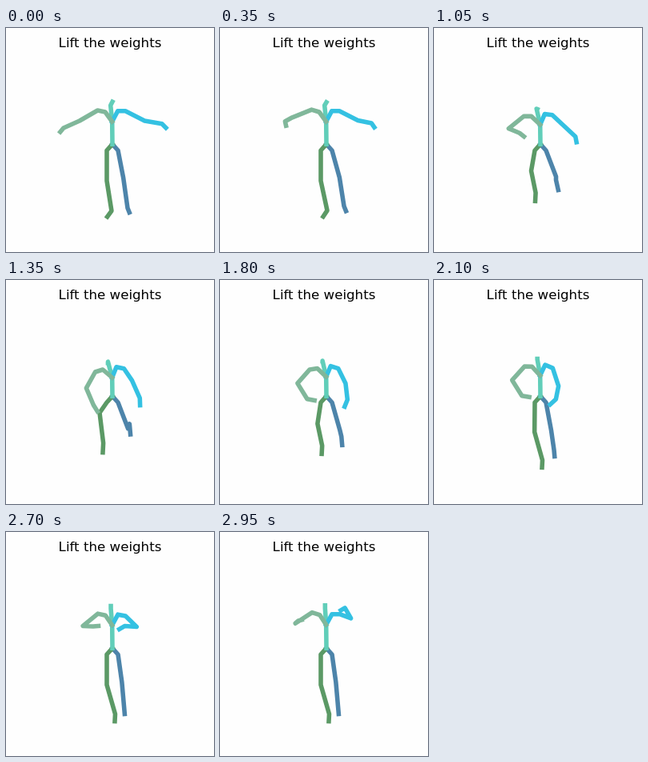
Recreate the animation shown at these times as an HTML page with a canvas. Size 260x280 px, loop 3 s.

```html
<!DOCTYPE html>
<html lang="en">
<head>
<meta charset="utf-8">
<title>Lift the weights</title>
<style>
html, body { margin: 0; width: 100%; height: 100%; overflow: hidden; background: #fefefe; }
canvas { display: block; }
</style>
</head>
<body>
<canvas id="stage" width="260" height="280"></canvas>
<script>
const ctx = document.getElementById('stage').getContext('2d');
const LOOP = 3000, STEP = 50;
const PELVIS = [133, 145.3], HIP_R = [140, 153], HIP_L = [126, 153];

// Smooth step from 0 to 1 between times a and b.
function ramp(t, a, b) {
  const u = Math.min(1, Math.max(0, (t - a) / (b - a)));
  return u * u * (3 - 2 * u);
}

// Joints of a limb built from [angle in degrees, signed length] bones.
function limb(root, ...bones) {
  const joints = [root];
  let [x, y] = root;
  for (const [angle, length] of bones) {
    const a = angle * Math.PI / 180;
    x += length * Math.cos(a);
    y += length * Math.sin(a);
    joints.push([x, y]);
  }
  return joints;
}

function chain(color, ...points) {
  ctx.strokeStyle = color;
  ctx.beginPath();
  points.forEach(p => ctx.lineTo(...p));
  ctx.stroke();
}

function draw(t) {
  // Phases of the movement, each going from 0 to 1.
  const pull = ramp(t, 0, 750);
  const step = ramp(t, 250, 850);
  const drop = ramp(t, 700, 1350);
  const turn = ramp(t, 1350, 1850);
  const curl = ramp(t, 1350, 2400);
  const lift = ramp(t, 2400, 2950);
  const squat = ramp(t, 750, 1350) - ramp(t, 1350, 2200);
  const lean = 5 * (ramp(t, 500, 1300) - ramp(t, 1400, 2750)) - lift;

  const chest = [132.7, 117 + lean];
  const neck = [130.7 - 0.65 * lean, 96.7 + 1.1 * lean];
  const head = [neck[0] + 2.3 * (1 - drop), neck[1] - 4.5 + 1.5 * pull + 0.9 * lean];
  const collarR = [139.7 - 0.35 * lean, chest[1] - 13.3];
  const collarL = [124 - 0.6 * lean, chest[1] - 12 + 0.4 * lean];
  const shoulderR = [collarR[0] + 9.5, collarR[1] + 2 * drop + 2.5 * curl - 4.5 * lift];
  const shoulderL = [collarL[0] - 9.5, collarL[1] - 2 - 2 * pull + 7 * drop - 4 * curl - 2 * lift];

  const rightLeg = limb(HIP_R,
    [79 - 10 * pull + 13 * curl, 35],
    [82 - 13 * step + 39 * (drop - turn) + 16 * curl, 38 - 21 * step - 23 * drop + 39 * curl],
    [68 + 17 * drop, 6 + 7 * step - 6 * curl]);

  const kneeL = [HIP_L[0] - 9 * squat, HIP_L[1] + 38 - 25 * squat];
  const leftLeg = limb(kneeL,
    [81 - 7 * pull + 9 * squat, 38 - 40 * squat * (1 - squat)],
    [126 - 33 * step, 9 + 3 * squat]);

  const rightArm = limb(shoulderR,
    [27 + 29 * drop + 20 * curl - 56 * lift, 27 - 2.4 * pull - 6.6 * drop + 7 * curl - 10 * lift],
    [10 + 4 * pull + 52 * drop + 44 * curl + 130 * lift, 22 - 10 * pull + 12 * drop - 9 * curl],
    [45 + 23 * pull + 20 * drop + 61 * curl, 7 - 2 * pull + 4 * drop + curl - 4 * lift]);

  const leftArm = limb(shoulderL,
    [150 + 18 * pull - 49 * drop + 13 * turn + 15 * lift, 26 - 3 * drop + 2 * lift],
    [156 - 10 * pull + 101 * drop - 9 * turn - 98 * lift, 22 - 26 * pull - 19 * drop + 18 * lift],
    [129 - 115 * pull + 44 * drop - 48 * turn - 25 * lift, 6.4 - 2 * pull + 5 * drop - 5 * lift]);

  ctx.fillStyle = '#fefefe';
  ctx.fillRect(0, 0, 260, 280);
  ctx.fillStyle = '#000';
  ctx.font = '16.67px "DejaVu Sans", sans-serif';
  ctx.textAlign = 'center';
  ctx.fillText('Lift the weights', 130, 24);

  ctx.lineWidth = 5.56;
  ctx.lineCap = 'square';
  ctx.lineJoin = 'round';
  chain('#4D84AA', PELVIS, ...rightLeg);
  chain('#5B9965', PELVIS, HIP_L, ...leftLeg);
  chain('#61CEB9', PELVIS, chest, neck, head);
  chain('#34C1E2', chest, collarR, ...rightArm);
  chain('#80B79A', chest, collarL, ...leftArm);
}

const start = performance.now();
function tick() {
  const t = (performance.now() - start) % LOOP;
  draw(Math.floor(t / STEP) * STEP);
  requestAnimationFrame(tick);
}
tick();
</script>
</body>
</html>
```
